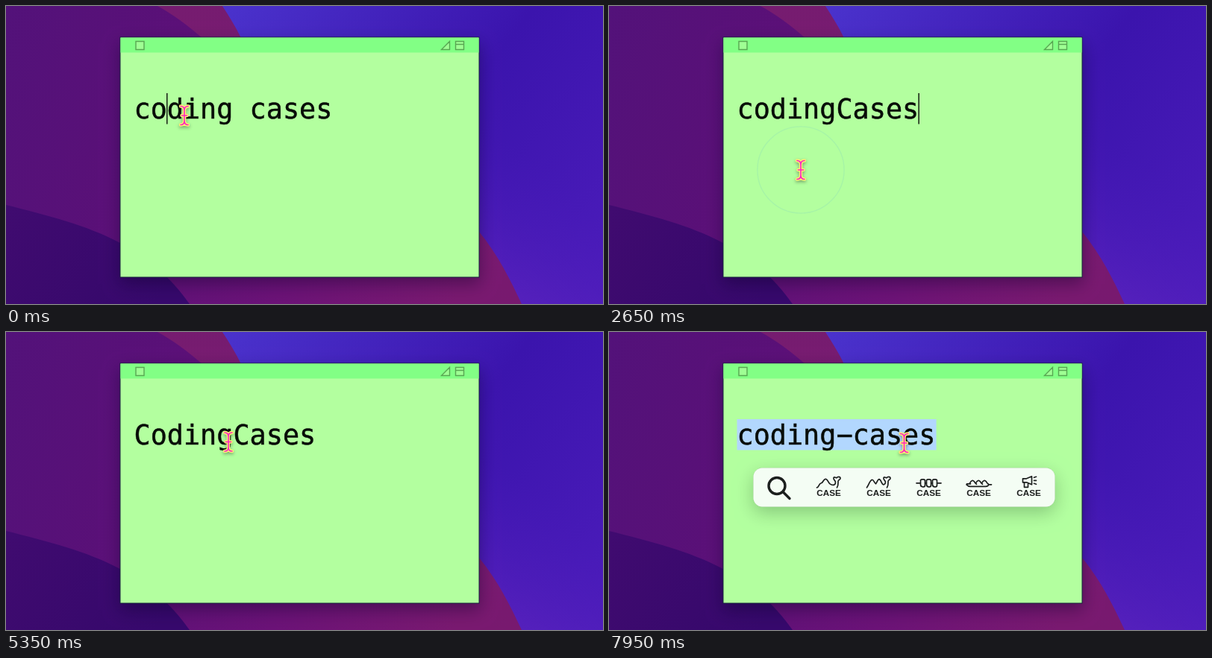
An HTML page with a canvas for the animation above (8000 ms loop, 800 px wide and 400 px high).

```html
<!DOCTYPE html>
<html lang="en">
<head>
<meta charset="utf-8">
<title>Coding cases</title>
<style>
  html, body { margin: 0; width: 100%; height: 100%; overflow: hidden; }
  canvas { display: block; width: 100vw; height: 100vh; }
</style>
</head>
<body>
<canvas width="800" height="400"></canvas>
<script>
const ctx = document.querySelector('canvas').getContext('2d');
const LOOP = 8000, LEFT = 171.5, CHAR = 22.15, CONVERT_DELAY = 90;
const BAR = { width: 404, height: 52, radius: 12, slot: 67.2 };

// Each round: select the text at `spot`, then press a bar button at `target`.
const rounds = [
  { select: 950, spot: [370, 149], press: 2320, target: [257, 220], result: 'codingCases', shadow: .25 },
  { select: 3200, spot: [299, 135.5], press: 4300, target: [272, 203], result: 'CodingCases', shadow: 0 },
  { select: 5400, spot: [298, 147.5], press: 6630, target: [320, 202], result: 'coding−cases', shadow: .17 },
  { select: 7280, spot: [395.5, 149], press: Infinity, target: [0, 0], result: '', shadow: .25 }
];

// Pointer stops: time, x, y
const stops = [
  [0, 239, 147], [850, 370, 149], [1750, 370, 149], [2250, 257, 220],
  [2750, 257, 220], [3150, 299, 135.5], [3680, 299, 135.5], [4200, 272, 203],
  [4600, 272, 203], [5200, 298, 147.5], [5950, 298, 147.5], [6550, 320, 202],
  [6850, 320, 202], [7250, 395.5, 149], [LOOP, 395.5, 149]
];

const clamp = v => Math.max(0, Math.min(1, v));
const ease = v => v * v * (3 - 2 * v);

const head = 'C9 17 6 17 6.500 14 C7 12 9 14 10.500 14 C12 12 15 12 15.500 14 C16 17 12.500 16 12.500 19 C12.500 22 13 24 11 27';
const icons = [
  'M-16 27 C-13 27 -14 22 -10 21 C-7 20 -7 15 -4 15.500 C0 17 -1 22 3 23 C6 24 9 24 9 20 ' + head,
  'M-16 27 C-13 23 -12 17 -9 16.500 C-7 16 -6 21 -4 22 C-2 19 -1 15 1 16 C4 18 4 24 7 23 C9 22 9 21 9 20 ' + head,
  'M-16.500 21 H-11 M11 21 H16.500 M-5 21 h2 M3 21 h2 ' +
    [-8, 0, 8].map(x => `M${x - 3} 18 q0 -2 2 -2 h2 q2 0 2 2 v6 q0 2 -2 2 h-1 q-3 0 -3 -3 z`).join(' '),
  'M-16.500 23 q3 3 6 2.500 H9 q4 0 4 -2.500 H17 M-16 22 h5 ' +
    [-8, 0, 8].map(x => `M${x - 4} 21 q3 -5.500 6 -2 q1 2 3 3.500`).join(' '),
  'M-8 15 h5 L4 12 V23 L-3 20 h-5 z M-6 20.500 V26.500 h5 V21 M7 13.500 l3 -1 M7 17.500 h3 M7 21.500 l3 1'
].map(d => new Path2D(d));
const ibeam = new Path2D('M-5 -12.500 Q0 -12.500 0 -7 Q0 -12.500 5 -12.500 M0 -8 V8 M-5 12.500 Q0 12.500 0 7 Q0 12.500 5 12.500 M-3.500 0 H3.500');
const arrow = new Path2D('M0 0 V23 L5 18.500 L9 27.500 L13 25.500 L9.500 17.500 H16.500 Z');

function gradient(x0, y0, x1, y1, ...colors) {
  const g = ctx.createLinearGradient(x0, y0, x1, y1);
  colors.forEach((c, i) => g.addColorStop(i / (colors.length - 1), c));
  return g;
}

function fill(style, d) {
  ctx.fillStyle = style;
  ctx.fill(new Path2D(d));
}

function shadow(color, blur, dy) {
  ctx.shadowColor = color;
  ctx.shadowBlur = blur;
  ctx.shadowOffsetY = dy;
}

function drawWallpaper() {
  fill(gradient(300, 0, 800, 400, '#4a32cc', '#3b14ad', '#4c1cbb'), 'M0 0 H800 V400 H0 Z');
  fill(gradient(650, 400, 750, 230, 'rgba(92,36,190,.8)', 'rgba(70,24,184,0)'), 'M600 0 H800 V400 H600 Z');
  fill(gradient(200, 0, 690, 400, '#761c70', '#78196f'),
    'M0 0 H290 C299 14 308 28 315 43 C400 170 560 200 634 303 C660 335 676 368 691 400 H0 Z');
  fill(gradient(0, 0, 660, 200, '#53127a', '#5a1077', '#6a1276', '#78196f'),
    'M0 0 H203 C222 10 245 27 263 43 L634 364 L656 400 H0 Z');
  fill(gradient(0, 270, 200, 400, '#400b70', '#35086b'), 'M0 267 C55 281 108 294 153 318 C192 338 222 366 246 400 H0 Z');
}

function drawWindow() {
  ctx.save();
  shadow('rgba(10,0,40,.38)', 20, 8);
  fill('#17263c', 'M152.500 41.500 H634.500 V364.500 H152.500 Z');
  ctx.restore();
  fill('#b3ff9f', 'M153.500 42.500 H633.500 V363.500 H153.500 Z');
  fill('#82ff85', 'M153.500 42.500 H633.500 V62.500 H153.500 Z');
  const buttons = new Path2D('M174 47.500 h11 v11 h-11 z M583.500 58.500 h11 v-11 z M602.500 47.500 h11 v11 h-11 z M602.500 51.500 h11');
  ctx.fillStyle = 'rgba(179,255,159,.6)';
  ctx.fill(buttons);
  ctx.strokeStyle = '#58a652';
  ctx.lineWidth = 1.4;
  ctx.stroke(buttons);
}

function pointerAt(t) {
  const i = stops.findIndex(s => s[0] > t);
  const [t0, x0, y0] = stops[i - 1], [t1, x1, y1] = stops[i];
  const k = ease((t - t0) / (t1 - t0));
  return [x0 + (x1 - x0) * k, y0 + (y1 - y0) * k];
}

function textState(t) {
  const state = { text: 'coding cases', caret: 2, since: 0, from: -1 };
  for (const r of rounds) {
    if (t >= r.select) {
      state.caret = Math.round((r.spot[0] - LEFT) / CHAR);
      state.since = r.select;
    }
    if (t >= r.select + 140) {
      const wordOnly = t < r.select + 280 && /[ −]/.test(state.text);
      state.from = wordOnly && state.caret > 6 ? 7 : 0;
    }
    const converted = r.press + CONVERT_DELAY;
    if (t >= converted) Object.assign(state, { text: r.result, caret: r.result.length, since: converted, from: -1 });
  }
  return state;
}

function drawText(t) {
  const { text, caret, since, from } = textState(t);
  if (from >= 0) {
    const x = LEFT + from * CHAR;
    ctx.fillStyle = '#b2d7fe';
    ctx.fillRect(x, 117, LEFT + text.length * CHAR + 1.3 - x, 41.5);
  }
  ctx.fillStyle = ctx.strokeStyle = '#080d08';
  ctx.font = '36.8px "DejaVu Sans Mono", monospace';
  ctx.textAlign = 'left';
  ctx.lineWidth = .5;
  ctx.fillText(text, LEFT, 150.7);
  ctx.strokeText(text, LEFT, 150.7);
  if (from < 0 && (t - since) % 1100 < 560) ctx.fillRect(LEFT + caret * CHAR - .7, 117, 1.4, 41.5);
}

// Returns whether the pointer is over the visible bar.
function drawBar(t, r, px, py) {
  const shown = r.select + 400;
  const alpha = clamp((t - shown) / 100) * clamp((r.press + 250 - t) / 140);
  if (!alpha) return false;
  const x = r.spot[0] - BAR.width / 2, y = r.spot[1] + 33.5;
  const over = px > x && px < x + BAR.width && py > y && py < y + BAR.height;
  const active = over && t < r.press + CONVERT_DELAY ? Math.floor((px - x) / BAR.slot) : -1;
  const box = new Path2D();
  box.roundRect(0, 0, BAR.width, BAR.height, BAR.radius);

  ctx.save();
  ctx.globalAlpha = alpha;
  ctx.translate(x, y);
  if (r.shadow) {
    // Only the outside of the bar casts a shadow, so its fill stays translucent.
    ctx.save();
    const outside = new Path2D('M-60 -60 H464 V120 H-60 Z');
    outside.addPath(box);
    ctx.clip(outside, 'evenodd');
    shadow(`rgba(0,30,10,${r.shadow})`, 24, 8);
    ctx.fillStyle = '#fff';
    ctx.fill(box);
    ctx.restore();
    ctx.strokeStyle = 'rgba(0,40,10,.15)';
    ctx.lineWidth = 1;
    ctx.stroke(box);
  }
  ctx.fillStyle = r.shadow ? 'rgba(252,253,253,.9)' : 'rgba(255,255,255,.93)';
  ctx.fill(box);
  ctx.clip(box);
  if (active >= 0) {
    ctx.fillStyle = '#1a80e6';
    ctx.fillRect(active * BAR.slot, 0, BAR.slot, BAR.height);
  }
  const ink = slot => slot === active ? '#fff' : '#1c1f1e';
  ctx.lineCap = ctx.lineJoin = 'round';
  ctx.strokeStyle = ink(0);
  ctx.lineWidth = 3.4;
  ctx.beginPath();
  ctx.arc(31.5, 24, 11, 0, 7);
  ctx.moveTo(40, 32.5);
  ctx.lineTo(48.5, 41);
  ctx.stroke();
  ctx.font = 'bold 11.7px "Liberation Sans", Arial, sans-serif';
  ctx.textAlign = 'center';
  ctx.lineWidth = 1.7;
  icons.forEach((icon, i) => {
    ctx.save();
    ctx.translate(101 + i * 67, -.7);
    ctx.strokeStyle = ctx.fillStyle = ink(i + 1);
    ctx.stroke(icon);
    ctx.fillText('CASE', 0, 38);
    ctx.restore();
  });
  ctx.restore();
  return over;
}

function drawRing(age, [x, y]) {
  if (age < 0 || age > 370) return;
  const strength = Math.min(.2 + age / 250, (370 - age) / 385, .65);
  ctx.strokeStyle = `rgba(50,140,235,${strength})`;
  ctx.lineWidth = 5 - age / 90;
  ctx.beginPath();
  ctx.arc(x, y, 25 + age / 10, 0, 7);
  ctx.stroke();
}

function drawPointer(x, y, isArrow) {
  ctx.save();
  ctx.translate(x, y);
  ctx.lineCap = ctx.lineJoin = 'round';
  const shape = isArrow ? arrow : ibeam;
  ctx.save();
  shadow('rgba(0,0,0,.35)', 4, 2);
  ctx.strokeStyle = isArrow ? '#ffdf3c' : '#ffee75';
  ctx.lineWidth = isArrow ? 3.5 : 4.5;
  ctx.stroke(shape);
  ctx.restore();
  ctx.fillStyle = ctx.strokeStyle = '#fb25c2';
  ctx.lineWidth = 1.6;
  if (isArrow) ctx.fill(shape);
  else ctx.stroke(shape);
  ctx.restore();
}

function frame() {
  const t = performance.now() % LOOP;
  const [px, py] = pointerAt(t);
  drawWallpaper();
  drawWindow();
  drawText(t);
  const overBar = rounds.map(r => drawBar(t, r, px, py)).some(Boolean);
  for (const r of rounds) {
    for (const delay of [0, 140, 280]) drawRing(t - r.select - delay, r.spot);
    drawRing(t - r.press, r.target);
  }
  drawPointer(px, py, overBar);
  requestAnimationFrame(frame);
}
frame();
</script>
</body>
</html>
```
